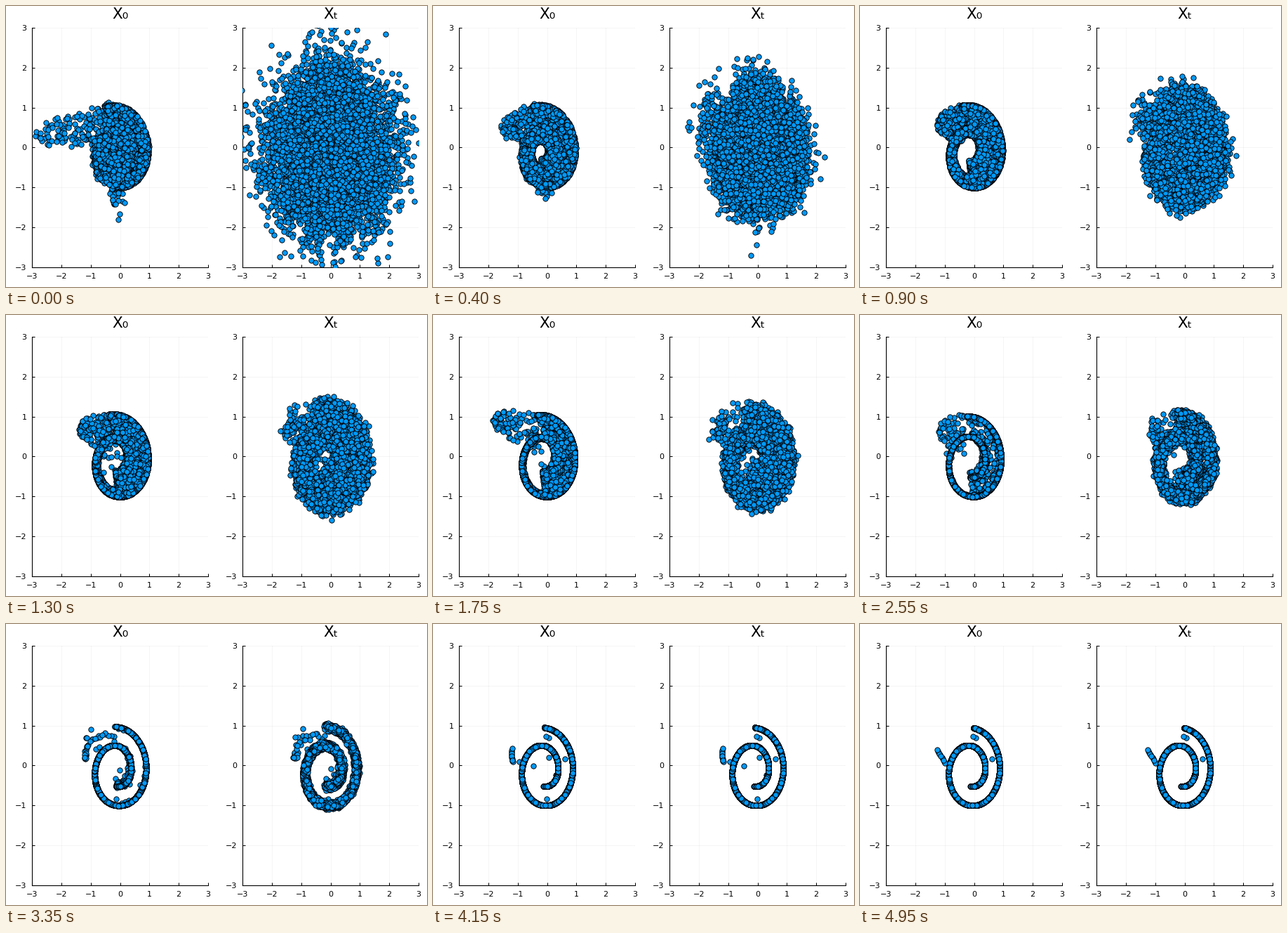
Animation of 600 by 400 pixels, one loop 5000 ms. Source, as a matplotlib script:

```python
import numpy as np
import matplotlib.pyplot as plt
from matplotlib.animation import FuncAnimation

W, H, DPI = 600, 400, 100
FRAMES, STEP = 100, 50
N, STRAY, DRIP, LATE = 7000, 250, 45, 24
BLUE = "#009afa"
TURN = 2 * np.pi
T0, T1 = 0.75 * TURN, 14.05
CENTRE = np.array([-0.25, -0.1])
SETTLED = 83

rng = np.random.default_rng(7)


def ramp(x, lo, hi):
    u = np.clip((x - lo) / (hi - lo), 0, 1)
    return u * u * (3 - 2 * u)


def spiral(t):
    x = 0.0788 * t * np.cos(t) - 0.12
    y = 0.0777 * t * np.sin(t) - 0.145 + 0.04 * np.exp(-(t - 7.9) ** 2)
    return np.column_stack([x, y])


def walk(rho, dims):
    """Slowly wandering normal noise, one row per step."""
    out = rng.normal(size=(FRAMES, N, dims))
    for k in range(1, FRAMES):
        out[k] = rho * out[k - 1] + np.sqrt(1 - rho * rho) * out[k]
    return out


noise = np.clip(walk(0.95, 2), -3.2, 3.2)
mix = 1 / (1 + np.exp(-1.7 * walk(0.97, 2)))

base = rng.uniform(T0, T1, N)
drip = slice(STRAY, STRAY + DRIP)
base[drip] = rng.normal(10.95, 0.13, DRIP)
drop = np.minimum(rng.exponential(0.35, DRIP), 0.8)
bulge = rng.exponential(0.04, N) * ((base > 8) & (base < 10.4))
reach, side = rng.uniform(0, 1, (2, STRAY))
leave = 24 + 72 * (1 - np.arange(STRAY) / STRAY) ** 3
order = rng.permutation(N)

# The last stragglers: an arc that thins out into a short straight tail.
along = np.linspace(0, 1, LATE)
angle = np.pi * (1.05 - 0.65 * along ** 1.5)
arc = np.column_stack([-0.42 + 0.82 * np.cos(angle), 0.2 + 0.58 * np.sin(angle)])
in_tail = along < 0.45
tail = np.column_stack([-1.0 - 0.57 * along, 0.07 + 0.75 * along])
islands = np.array([[-0.03, 0.73], [0.07, 0.69], [0.6, 0.16]])


def sigma(k):
    return max(0, 1 - k / SETTLED) * (0.19 + 0.51 * np.exp(-k / 7))


def arm(t, k):
    """Spiral with its outer turn stretched early on."""
    ext = 0.4 * (1 - k / (FRAMES - 1))
    grow = 0.13 * (1 - ramp(k, 10, 85))
    pos = spiral(t + ext * ramp(t, 12.6, T1))
    return pos * (1 + grow * ramp(t, 10.8, 12.8))[:, None]


def cloud(k):
    """Loose points that stick out to the upper left."""
    swell = np.exp(-((k - 35) / 8) ** 2)
    length = 0.85 + 1.6 * np.exp(-k / 5) + 0.65 * swell
    u = reach ** (1 + 2 * np.exp(-k / 8))
    tilt = 0.3 * swell - 0.3 * np.exp(-k / 8)
    x = -0.35 - length * u
    y = 0.62 + tilt * u + 0.45 * (2 * side - 1) * np.sqrt(1 - u * u)
    return np.column_stack([x, y])


def place_strays(pos, k):
    home = pos[:STRAY].copy()
    loose = cloud(k) + 0.1 * sigma(k) * noise[k, :STRAY]
    loose[:LATE] += ramp(k, 54, 70) * (arc - loose[:LATE])
    back = ramp(k, leave - 8, leave)
    back[:LATE][in_tail] = 0
    pos[:STRAY] = loose + back[:, None] * (home - loose)

    glide = ramp(k, SETTLED - 8, FRAMES - 2)
    pos[:LATE][in_tail] += glide * (tail - pos[:LATE])[in_tail]
    pos[LATE - len(islands):LATE] += ramp(k, 74, SETTLED) * (
        islands - pos[LATE - len(islands):LATE])


def estimate(k):
    t = np.clip(base + 0.25 * sigma(k) * noise[k, :, 0], T0, T1)
    t[drip] = base[drip]
    pos = arm(t, k)

    # Fill the gap between neighbouring turns, sharpening with time.
    power = np.exp(8 * (min(k, SETTLED) / SETTLED) ** 1.8)
    inner, outer = t < T1 - TURN, t > T0 + TURN
    v = 0.5 * mix[k, :, 0] ** power * (1 - ramp(k, 68, 82)) * (inner | outer)
    v[drip] = 0
    other = np.where(inner, t + TURN, np.where(outer, t - TURN, t))
    pos += v[:, None] * (arm(other, k) - pos)

    # Pull the inner turn and the left side into the middle.
    left = np.exp(-k / 16)
    tip = 0.4 * (1 - ramp(k, 60, SETTLED)) + 0.6 * np.exp(-k / 8)
    pull = left + (tip - left) * (1 - ramp(t, 5.6, 7.8))
    pull = pull * mix[k, :, 1] ** min(power, 30) * ~outer
    pos += pull[:, None] * (CENTRE - pos)

    pos *= 1 + (bulge * (1 - ramp(k, 0, 16)))[:, None]
    pos[drip, 1] -= drop * (1 - ramp(k, 0, 13))
    place_strays(pos, k)
    return pos


def diffuse(pos, k):
    """Spread the estimate outwards and add the remaining noise."""
    radius = np.hypot(*pos.T)[:, None]
    core = pos * np.minimum(1, 1.35 / radius)
    spread = 1 + 0.5 * max(0, 1 - k / 60) ** 2
    return core * spread + sigma(k) * noise[k]


plt.rcParams["font.family"] = "DejaVu Sans"
fig = plt.figure(figsize=(W / DPI, H / DPI), dpi=DPI, facecolor="white")


def panel(left, title):
    ax = fig.add_axes([left / W, 28 / H, 251 / W, 341 / H])
    ax.set(xlim=(-3, 3), ylim=(-3, 3), xticks=range(-3, 4), yticks=range(-3, 4))
    ax.set_axisbelow(True)
    ax.grid(color="black", alpha=0.06, lw=0.5)
    ax.spines[["top", "right"]].set_visible(False)
    ax.spines[["left", "bottom"]].set_linewidth(0.8)
    ax.tick_params(direction="in", length=2.8, width=0.75, labelsize=8, pad=5.5)
    fig.text((left + 125.5) / W, 1 - 18.5 / H, title, fontsize=15.5,
             ha="center", va="baseline")
    dots, = ax.plot([], [], "o", ms=5.3, mfc=BLUE, mec="black", mew=0.65, zorder=3)
    return dots


clean = panel(37, "X\u2080")
noisy = panel(337, "X\u209c")


def draw(k):
    pos = estimate(k)
    clean.set_data(*pos[order].T)
    noisy.set_data(*diffuse(pos, k)[order].T)
    return clean, noisy


anim = FuncAnimation(fig, draw, frames=FRAMES, interval=STEP, repeat=True, repeat_delay=0)
plt.show()
```
